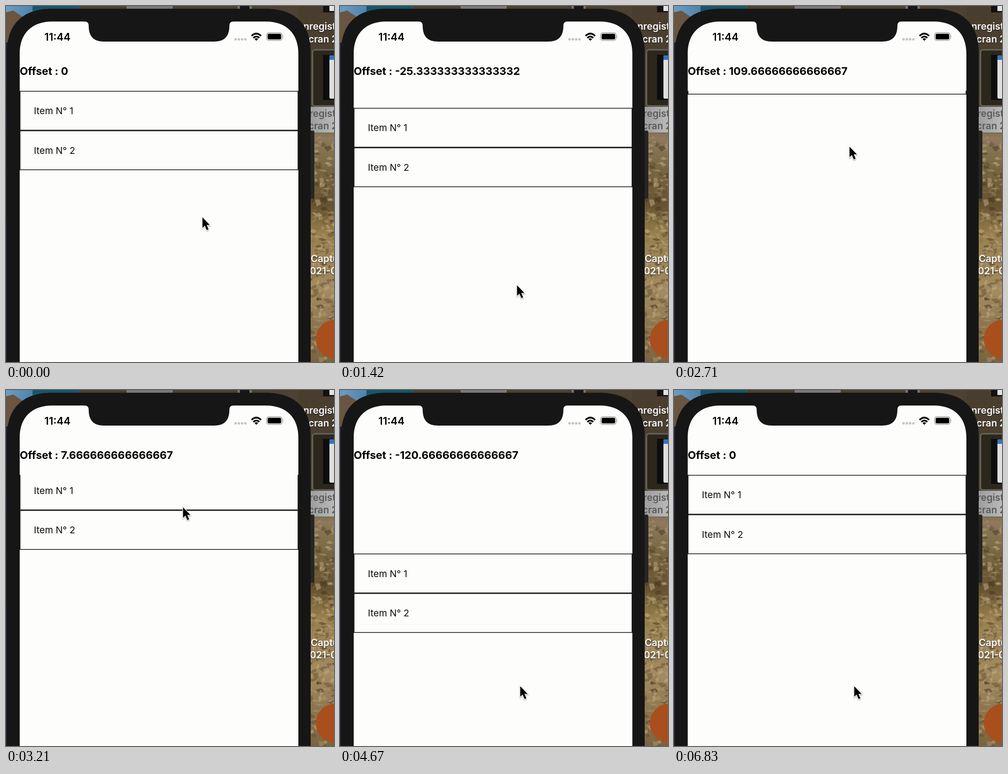
Recreate the animation shown at these times as an HTML page. Size 718x780 px, loop 6870 ms.

```html
<!DOCTYPE html>
<html lang="fr">
<head>
<meta charset="utf-8">
<style>
  html, body { margin: 0; width: 100%; height: 100%; overflow: hidden; background: #4b4233; }
  svg { display: block; width: 718px; height: 780px; }
  text { font-family: Inter, "Liberation Sans", sans-serif; white-space: pre; }
  .label { font-size: 21px; font-weight: 600; fill: #f4f4f2; }
  .dim { fill: #5b5b5b; }
  .item { font-size: 20.4px; fill: #0b0b0b; }
</style>
</head>
<body>
<svg viewBox="0 0 718 780">
  <defs>
    <linearGradient id="sky" x2="1">
      <stop offset="0" stop-color="#6b9cc4"/><stop offset="1" stop-color="#25577c"/>
    </linearGradient>
    <linearGradient id="land" x2="0" y2="1">
      <stop offset="0" stop-color="#493d2e"/><stop offset=".3" stop-color="#4d4332"/>
      <stop offset=".37" stop-color="#8d7a5c"/><stop offset=".46" stop-color="#786541"/>
      <stop offset=".56" stop-color="#66522f"/><stop offset=".64" stop-color="#99804f"/>
      <stop offset=".8" stop-color="#a38a60"/><stop offset="1" stop-color="#786340"/>
    </linearGradient>
    <linearGradient id="select" x2="1">
      <stop offset="0" stop-color="#8f8f8f"/><stop offset="1" stop-color="#b9b9b9"/>
    </linearGradient>
    <clipPath id="list"><rect x="30" y="186" width="610" height="594"/></clipPath>
    <filter id="shade" x="-50%" y="-50%" width="200%" height="200%">
      <feDropShadow dx="0" dy="1.5" stdDeviation="1.3" flood-opacity=".4"/>
    </filter>
    <filter id="glow"><feDropShadow dx="0" dy="1" stdDeviation="1.2" flood-opacity=".8"/></filter>
  </defs>

  <!-- desktop -->
  <rect width="718" height="100" fill="#4d4132"/>
  <rect width="160" height="60" fill="url(#sky)"/>
  <rect x="58" width="99" height="12" fill="#17566b"/>
  <path d="M0 14L16 10L34 22L48 34L0 90Z" fill="#695541"/>
  <rect y="80" width="4" height="700" fill="#1b2638"/>
  <rect x="265" y="-5" width="99" height="10" fill="#77777a" stroke="#99999b"/>
  <rect x="507" width="31" height="9" fill="#77746d"/>
  <rect x="512" width="21" height="9" fill="#18181a"/>
  <rect x="640" width="78" height="780" fill="url(#land)"/>
  <g id="rocks"></g>
  <rect x="694" width="24" height="14" fill="#121212"/>
  <rect x="708" width="10" height="11" fill="#e2e2e2"/>
  <rect x="671" y="96" width="60" height="123" rx="5" fill="#2c271c" stroke="#67645a" stroke-width="3"/>
  <rect x="694" y="107" width="24" height="99" fill="#0d0d0e"/>
  <rect x="708" y="108" width="20" height="95" rx="3" fill="#dededf"/>
  <path d="M708 118V111Q708 108 711 108H718V118Z" fill="#3476bb"/>
  <rect x="640" y="221" width="78" height="56" fill="url(#select)"/>
  <g filter="url(#glow)">
    <text class="label" x="651" y="52">nregist</text>
    <text class="label" x="662" y="80">cran 2</text>
    <text class="label" x="667" y="561">Captu</text>
    <text class="label" x="665" y="588">021-0</text>
  </g>
  <text class="label dim" x="651" y="243">nregist</text>
  <text class="label dim" x="662" y="270">cran 2</text>
  <circle cx="721" cy="730" r="43" fill="#a94f1d"/>

  <!-- phone -->
  <path d="M0 181H4V231H0ZM0 275H4V361H0ZM0 366H4V464H0Z" fill="#202022"/>
  <rect x="660" y="273" width="15" height="149" rx="3" fill="#262624"/>
  <path d="M2 790V102C2 39 37 6 101 6H568C632 6 667 39 667 102V790Z" fill="#161616"/>
  <path d="M30 790V104C30 60 57 34 101 34H172Q181 34 181 43C181 67 192 78 215 78H455C478 78 489 67 489 43Q489 34 498 34H569C613 34 640 60 640 104V790Z" fill="#fdfdfc"/>
  <text x="84" y="76" font-size="23" font-weight="600">11:44</text>
  <g fill="#c4c4bf">
    <circle cx="502.500" cy="73" r="2.700"/><circle cx="509.700" cy="73" r="2.700"/>
    <circle cx="516.900" cy="73" r="2.700"/><circle cx="524.100" cy="73" r="2.700"/>
  </g>
  <g fill="none" stroke="#000" stroke-width="3.600">
    <path d="M537.500 65.500Q548 55.500 558.500 65.500"/><path d="M541.500 70Q548 63.700 554.500 70"/>
  </g>
  <path d="M544 72.300Q548 69 552 72.300L548 76.300Z"/>
  <rect x="570.500" y="58.500" width="34" height="17" rx="5" fill="none" stroke="#999" stroke-width="1.500"/>
  <rect x="572.700" y="60.700" width="29.600" height="12.600" rx="3"/>
  <path d="M606.300 64Q608.500 67 606.300 70Z" fill="#999"/>

  <!-- application -->
  <text id="offset" x="30" y="151" font-size="23.500" font-weight="700"></text>
  <g clip-path="url(#list)">
    <g id="items">
      <g fill="none" stroke="#0b0b0b" stroke-width="1.500">
        <rect x="30.750" y="186.700" width="608.500" height="85.300"/>
        <rect x="30.750" y="273.500" width="608.500" height="85.300"/>
      </g>
      <text class="item" x="61" y="237">Item N° 1</text>
      <text class="item" x="61" y="323.700">Item N° 2</text>
    </g>
  </g>
  <path id="cursor" d="M0 0V23L5.200 18.200L9.400 28L13.500 26.200L9.300 16.700H16.200Z" stroke="#fff" stroke-width="2.400" paint-order="stroke" filter="url(#shade)"/>
</svg>
<script>
const LOOP = 6870, SCALE = 1.473, VIEW = 700, SPRING = 0.0133, LABEL_LAG = 15;
const byId = id => document.getElementById(id);

// Pointer stops: time, x, y
const stops = [
  [0, 430, 463], [850, 408, 541.6], [1420, 387.5, 612], [1560, 361, 667],
  [2200, 361, 667], [2856, 387.5, 257], [3400, 387.5, 257],
  [4210, 401.5, 545.6], [4650, 394.5, 649], [LOOP, 394.5, 649]
];
// Press and release times
const drags = [[850, 1560], [2200, 2856], [3400, 4650]];

function pointer(t) {
  const i = Math.max(1, stops.findIndex(s => s[0] >= t));
  const [t0, x0, y0] = stops[i - 1], [t1, x1, y1] = stops[i];
  const p = Math.max(0, (t - t0) / (t1 - t0)), k = p * p * (3 - 2 * p);
  return { x: x0 + (x1 - x0) * k, y: y0 + (y1 - y0) * k };
}

// Overscroll resistance, as a signed scroll offset
function rubber(pixels) {
  const d = Math.abs(pixels) / SCALE;
  return -Math.sign(pixels) * VIEW * (1 - 1 / (1 + 0.55 * d / VIEW));
}

function scrollOffset(t) {
  let sum = 0;
  for (const [press, release] of drags) {
    if (t <= press) continue;
    const pull = rubber(pointer(Math.min(t, release)).y - pointer(press).y);
    const u = SPRING * Math.max(0, t - release);
    sum += pull * (1 + u) * Math.exp(-u);
  }
  return Math.abs(sum) < 0.25 ? 0 : sum;
}

function drawRocks() {
  let seed = 11;
  const random = () => (seed = seed * 16807 % 2147483647) / 2147483647;
  const tones = ["#3b301f", "#5d4c2e", "#857048", "#b59d70", "#cbb68c"];
  let shapes = "";
  for (let i = 0; i < 260; i++) {
    const x = 660 + random() * 58, y = 280 + random() * 500;
    const w = 3 + random() * 10, h = 2 + random() * 8;
    const tone = tones[Math.floor(random() * tones.length)];
    shapes += `<path d="M${x} ${y}l${w} ${-h * random()}l${w * random()} ${h}l${-w} ${h * random()}Z" fill="${tone}" opacity=".45"/>`;
  }
  byId("rocks").innerHTML = shapes;
}

function draw(t) {
  const { x, y } = pointer(t);
  const shown = Math.round(scrollOffset(t - LABEL_LAG) * 3) / 3;
  byId("offset").textContent = `Offset : ${shown}`;
  byId("items").setAttribute("transform", `translate(0 ${-scrollOffset(t) * SCALE})`);
  byId("cursor").setAttribute("transform", `translate(${x} ${y})`);
}

drawRocks();
draw(0);
const start = performance.now();
requestAnimationFrame(function tick(now) {
  draw(Math.max(0, now - start) % LOOP);
  requestAnimationFrame(tick);
});
</script>
</body>
</html>
```
